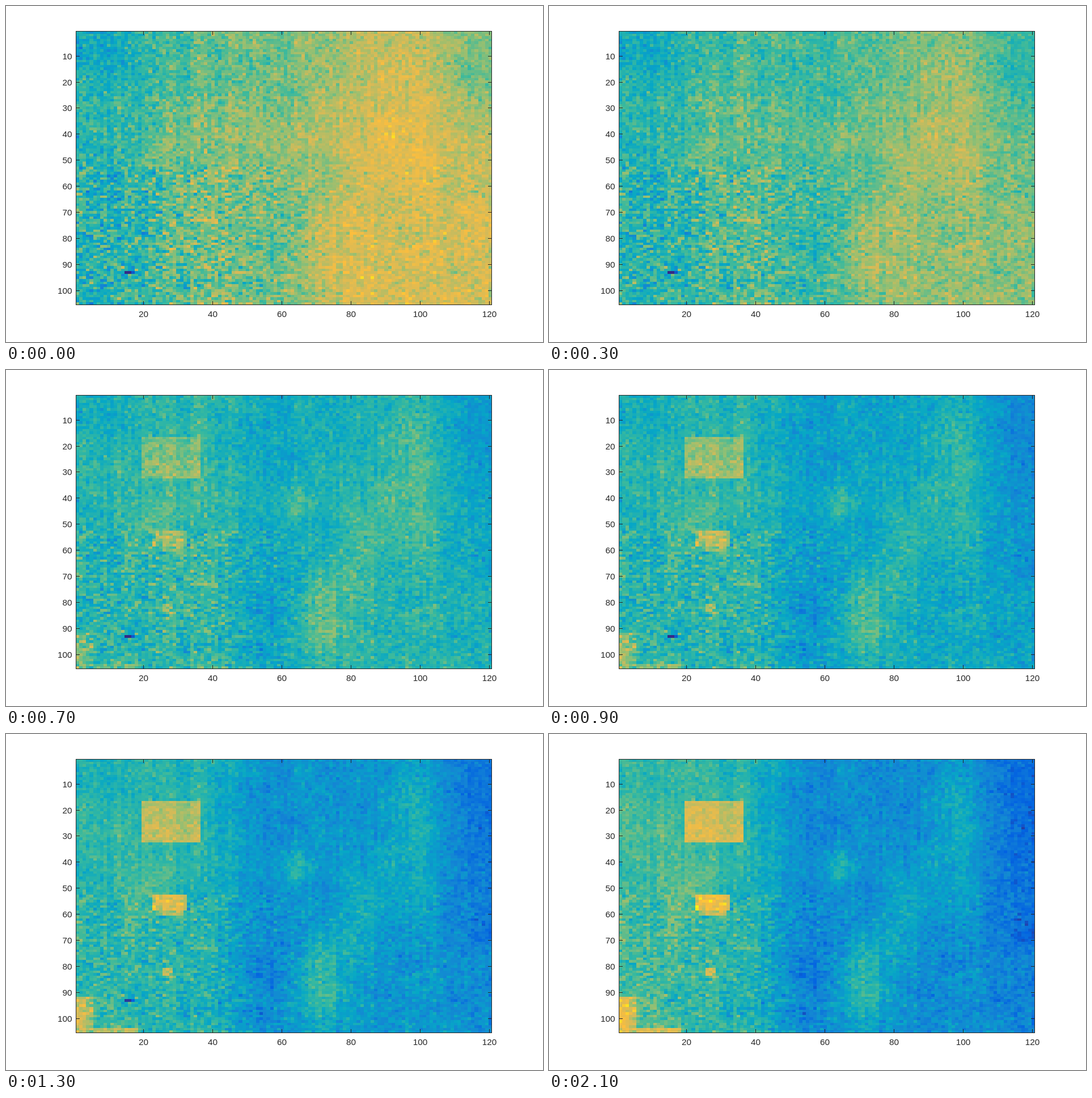
Write an HTML page with a canvas that moves like this. It is 947 px wide and 592 px high and loops after 2300 ms.

```html
<!DOCTYPE html>
<html lang="en">
<head>
<meta charset="utf-8">
<title>Heat map</title>
<style>
html, body { margin: 0; width: 100%; height: 100%; overflow: hidden; background: #fff; }
canvas { display: block; }
</style>
</head>
<body>
<canvas id="stage" width="947" height="592"></canvas>
<script>
const COLS = 120, ROWS = 105, SEAM = 53;
const plot = { x: 123, y: 44, w: 733, h: 482 };
const ctx = document.getElementById('stage').getContext('2d');
const map = document.createElement('canvas');
map.width = COLS;
map.height = ROWS;
const mapCtx = map.getContext('2d');
const pixels = mapCtx.createImageData(COLS, ROWS);

// Evenly spaced stops from cold to hot
const palette = [
  0x352a87, 0x0363e1, 0x1485d4, 0x06a7c6, 0x38b99e, 0x92bf73, 0xd9ba56, 0xfdbe3d, 0xf9fb0e
].map(c => [c >> 16, c >> 8 & 255, c & 255]);

const lerp = (a, b, t) => a + (b - a) * t;
const clamp = (v, lo, hi) => Math.max(lo, Math.min(hi, v));
const bump = (x, y, cx, cy, rx, ry) => Math.exp(-(((x - cx) / rx) ** 2) - ((y - cy) / ry) ** 2);
const inside = (x, y, l, t, r, b) => x >= l && x <= r && y >= t && y <= b;

function ramp(v, from, to) {
  const t = clamp((v - from) / (to - from), 0, 1);
  return t * t * (3 - 2 * t);
}

function hash(x, y, seed) {
  let h = Math.imul(x + 1, 374761393) ^ Math.imul(y + 1, 668265263) ^ Math.imul(seed + 1, 1274126177);
  h = Math.imul(h ^ (h >>> 15), 2246822519);
  h = Math.imul(h ^ (h >>> 13), 3266489917);
  return ((h ^ (h >>> 16)) >>> 0) / 4294967296;
}

// Roughly normal, unit deviation
const normal = (x, y, seed) =>
  2 * (hash(x, y, seed) + hash(x, y, seed + 1) + hash(x, y, seed + 2) - 1.5);

function softNoise(x, y) {
  const gx = x / 6, gy = y / 6, c = Math.floor(gx), r = Math.floor(gy);
  const row = i => lerp(normal(c, i, 40), normal(c + 1, i, 40), gx - c);
  return lerp(row(r), row(r + 1), gy - r);
}

// Warm on the right at first
const early = (x, y) => 0.41
  + 0.17 * ramp(x, 5, 45) + 0.13 * ramp(x, 60, 90) + 0.05 * ramp(y, 10, 45)
  - 0.1 * ramp(x, 100, 118) * (1 - ramp(y, 10, 90))
  - (y < SEAM ? 0 : 0.02)
  + 0.04 * bump(x, y, 96, 30, 8, 25)
  + 0.06 * bump(x, y, 76, 90, 12, 22)
  - 0.06 * bump(x, y, 53, 80, 7, 25)
  - 0.07 * bump(x, y, 113, 19, 4, 5);

// Cool on the right at the end
const late = (x, y) => 0.44
  - 0.17 * ramp(x, 36, 56) - 0.1 * ramp(x, 102, 118) * (1 - 0.7 * ramp(y, 50, 100))
  + 0.14 * bump(x, y, 98, 26, 7, 28)
  + 0.19 * bump(x, y, 71, 88, 8, 20)
  + 0.1 * bump(x, y, 83, 58, 8, 22)
  + 0.15 * bump(x, y, 64, 42, 4, 7)
  + 0.07 * bump(x, y, 18, 55, 6, 28)
  - 0.08 * bump(x, y, 53, 78, 5, 14)
  - 0.12 * bump(x, y, 117, 69, 5, 4);

// Shapes that emerge with hard edges
function glow(x, y) {
  if (inside(x, y, 20, 17, 36, 32)) return 0.26;
  if (inside(x, y, 23, 53, 32, 58)) return 0.34;
  if (inside(x, y, 24, 59, 31, 60)) return 0.24;
  if (inside(x, y, 26, 81, 28, 83)) return 0.22;
  if (inside(x, y, 1, 104, 18, 105)) return 0.28;
  if (inside(x, y, 1, 92, 5, 105)) return x < 4 ? 0.32 : 0.24;
  return inside(x, y, 6, 92, 12, 103) ? 0.05 : 0;
}

function makeCell(x, y) {
  const lower = y >= SEAM;
  const side = ramp(x, 30, 80);
  const streak = lower ? normal(x >> 1, y, 20) : normal(x, y >> 1, 20);
  const grain = 0.8 * normal(x, y, 10) + 0.6 * streak;
  const soft = 0.022 * softNoise(x, y) + 0.013 * normal(x, +lower, 30);
  return {
    x, y,
    start: early(x, y) + soft + grain * (lower ? lerp(0.095, 0.058, side) : lerp(0.06, 0.046, side)),
    end: late(x, y) + soft + grain * (lower ? lerp(0.062, 0.046, side) : 0.038),
    glow: glow(x, y),
    lift: 0.06 * clamp(1.2 - x / 45, 0, 1)
  };
}

const cells = [];
for (let y = 1; y <= ROWS; y++)
  for (let x = 1; x <= COLS; x++) cells.push(makeCell(x, y));

function level(cell, step) {
  // One cold streak that fades late
  if (inside(cell.x, cell.y, 15, 93, 17, 93))
    return 0.3 * ramp(step, 6, 11) + (cell.x === 17 ? 0.1 : 0);
  const mix = 1 - Math.exp(-((step / 4.1) ** 1.7));
  return lerp(cell.start, cell.end, mix) + cell.glow * mix ** 1.6 + cell.lift * ramp(step, 5, 11);
}

function colour(v) {
  const at = clamp(v, 0, 0.9999) * (palette.length - 1);
  const i = Math.floor(at);
  return palette[i].map((c, k) => lerp(c, palette[i + 1][k], at - i));
}

function drawAxes() {
  const { x, y, w, h } = plot;
  ctx.fillStyle = ctx.strokeStyle = '#262626';
  ctx.lineWidth = 1;
  ctx.strokeRect(x + 0.5, y + 0.5, w, h);
  ctx.font = '15.3px "Liberation Sans", Arial, sans-serif';
  ctx.textAlign = 'center';
  for (let n = 20; n <= COLS; n += 20) {
    const at = Math.floor(x + (n - 0.5) * w / COLS);
    ctx.fillRect(at, y, 1, 7);
    ctx.fillRect(at, y + h - 6, 1, 7);
    ctx.fillText(n, at + 0.5, 548);
  }
  ctx.textAlign = 'right';
  for (let n = 10; n < ROWS; n += 10) {
    const at = Math.round(y + (n - 0.5) * h / ROWS);
    ctx.fillRect(x, at, 7, 1);
    ctx.fillRect(x + w - 6, at, 7, 1);
    ctx.fillText(n, 116.5, at + 6);
  }
}

function draw(step) {
  cells.forEach((cell, i) => pixels.data.set([...colour(level(cell, step)), 255], i * 4));
  mapCtx.putImageData(pixels, 0, 0);
  ctx.fillStyle = '#fff';
  ctx.fillRect(0, 0, 947, 592);
  ctx.imageSmoothingEnabled = false;
  ctx.drawImage(map, plot.x, plot.y, plot.w + 1, plot.h + 1);
  drawAxes();
}

let shown = -1;
const began = performance.now();
function tick() {
  const t = (performance.now() - began) % 2300;
  const step = Math.floor((t + 100) / 200);
  if (step !== shown) draw(shown = step);
  requestAnimationFrame(tick);
}
tick();
</script>
</body>
</html>
```
